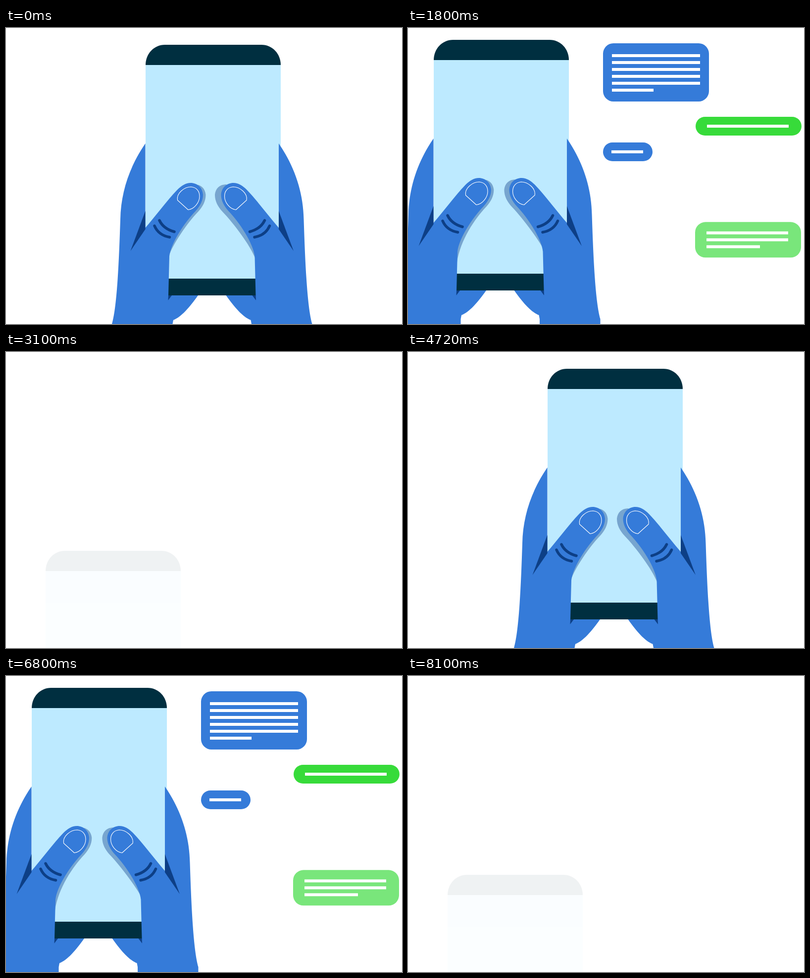
Animation, 800 px wide and 600 px high, one loop 8440 ms. Source, as an HTML page:

```html
<!DOCTYPE html>
<html lang="en">
<head>
<meta charset="utf-8">
<title>Phone chat</title>
<style>
  html, body { margin: 0; width: 100%; height: 100%; overflow: hidden; background: #fff; }
  svg { display: block; width: 100vw; height: 100vh; }
  .skin { fill: #357bd9; }
  .ink { fill: #002f40; }
  .screen { fill: #bdeaff; }
  .shade { fill: #77a5cf; }
  .fold { fill: #0d3f86; }
  .wrinkle { fill: none; stroke: #0d3f86; stroke-width: 5.5; stroke-linecap: round; }
  .nail { fill: none; stroke: #fff; stroke-width: 1.1; stroke-linejoin: round; }
</style>
</head>
<body>
<svg viewBox="0 0 800 600">
  <defs>
    <path id="back" class="skin" d="M300 520H402L388 542C371 566 354 586 338 592L336.500 600V800H300Z"/>
    <g id="hand">
      <path class="skin" d="M281.500 234C250 280 232 332 231 388C228 480 224 565 214 600V800H330V600L328 542L330 463C333 436 361 394 383 371C392 361 398 350 398 338C397 323 386 314 373 314C363 314 354 320 346 328C325 350 303 380 281.500 405Z"/>
      <path class="fold" d="M281.500 371L251.500 452L281.500 408Z"/>
      <path class="fold" d="M328 542H335L327.500 552Z"/>
      <path class="wrinkle" d="M310 390Q318 407 340 413M300 401Q308 420 330.500 424"/>
      <path class="nail" d="M346.500 349C344 335 360 322 374 322C385 323 391 331 391 341C391 353 381 367 368 368.500Z"/>
    </g>
  </defs>
  <g id="phone">
    <use href="#back"/>
    <use href="#back" transform="translate(832.5) scale(-1 1)"/>
    <rect class="screen" x="282" y="74" width="273" height="435"/>
    <path class="ink" d="M282 75C282 52 299 34 321 34H516C538 34 555 52 555 75Z"/>
    <rect class="ink" x="300" y="508" width="232" height="34"/>
    <path id="shadeL" class="shade"/>
    <path id="shadeR" class="shade" transform="translate(832.5) scale(-1 1)"/>
    <use href="#hand"/>
    <use href="#hand" transform="translate(832.5) scale(-1 1)"/>
  </g>
  <g id="chat"></g>
</svg>
<script>
const LOOP = 8440, CYCLE = 5000, STEP = 20;
const BLUE = '#357bd9', GREEN = '#37db3a';
const $ = id => document.getElementById(id);
const lerp = (a, b, p) => a + (b - a) * p;
const mix = (a, b, p) => a.map((v, i) => lerp(v, b[i], p));
const ramp = (t, a, b) => Math.min(1, Math.max(0, (t - a) / (b - a)));

function add(parent, name, attrs) {
  const el = document.createElementNS('http://www.w3.org/2000/svg', name);
  for (const k in attrs) el.setAttribute(k, attrs[k]);
  return parent.appendChild(el);
}

// place, size, line inset, line widths, line count; entry height and times
const messages = [
  { x: 394, y: 31, w: 214, h: 118, c: BLUE, inset: [18, 22], line: 178, last: 84, n: 6, from: -162, start: 1100, end: 1560 },
  { x: 581, y: 180, w: 214, h: 38, c: GREEN, inset: [23, 16], line: 165, last: 165, n: 1, from: 876, start: 1100, end: 1560 },
  { x: 394, y: 232, w: 100, h: 38, c: BLUE, inset: [17, 16], line: 64, last: 64, n: 1, from: 620, start: 1400, end: 1700 },
  { x: 580, y: 280, w: 214, h: 72, c: GREEN, inset: [23, 19], line: 165, last: 108, n: 3, from: 620, start: 1600, end: 1900 },
  { x: 393, y: 402, w: 214, h: 38, c: BLUE, inset: [23, 16], line: 165, last: 165, n: 1, from: 620, start: 1800, end: 2100 },
  { x: 579, y: 472, w: 214, h: 117.5, c: GREEN, inset: [18, 22], line: 178, last: 84, n: 6, from: 620, start: 2000, end: 2300 }
];

for (const m of messages) {
  m.el = add($('chat'), 'g', {});
  add(m.el, 'rect', { width: m.w, height: m.h, rx: Math.min(21, m.h / 2), fill: m.c });
  for (let i = 0; i < m.n; i++) {
    const width = i === m.n - 1 ? m.last : m.line;
    add(m.el, 'rect', { x: m.inset[0], y: m.inset[1] + 14 * i, width, height: 6, fill: '#fff' });
  }
}

function place(el, x, y, alpha) {
  el.setAttribute('transform', `translate(${x} ${y})`);
  el.setAttribute('opacity', alpha);
}

function shadePath(d, end) {
  return `M329 ${end}C${333 + d / 2} 440 ${360 + d} 396 ${383 + d} 372` +
    `C${392 + d} 362 ${398 + d} 351 ${398 + d} 338` +
    `C${397 + d} 326 ${389 + d} 317 ${375 + d} 317L340 360L325 440Z`;
}

// left spread, left end, right spread, right end
const REST = [5.5, 463, 12.5, 467], LIFT = [7, 489, 13.5, 460], PRESS = [3.5, 480, 6.5, 456];
// phone offset and opacity
const HOME = [0, 0, 1], SIDE = [-230, -10, 1], GONE = [-202, 369, 0.059];

function draw(time) {
  let t = time % LOOP;
  if (t >= CYCLE) t -= CYCLE;
  t = Math.floor(t / STEP + 1e-6) * STEP;

  const slide = t < 1100 ? 0 : ramp(t, 1080, 1349.5);
  const leave = ramp(t, 2800, 3100);
  const enter = ramp(t, 4380, 4720);

  let pose = mix(HOME, SIDE, slide);
  if (leave) pose = mix(SIDE, GONE, leave);
  if (enter) pose = mix(GONE, HOME, enter);
  place($('phone'), ...pose);

  let shade = mix(REST, LIFT, ramp(t, 1080, 1320));
  if (t > 1320) shade = mix(LIFT, PRESS, ramp(t, 1320, 2320));
  if (enter) shade = mix(PRESS, REST, enter);
  $('shadeL').setAttribute('d', shadePath(shade[0], shade[1]));
  $('shadeR').setAttribute('d', shadePath(shade[2], shade[3]));

  place($('chat'), 28 * leave, 379 * leave, 1 - leave);
  messages.forEach((m, i) => {
    const p = ramp(t, m.start, m.end);
    place(m.el, m.x, lerp(m.from, m.y, p), i < 2 ? slide : p);
  });
}

const began = performance.now();
function tick() {
  draw(performance.now() - began);
  requestAnimationFrame(tick);
}
draw(0);
requestAnimationFrame(tick);
</script>
</body>
</html>
```
